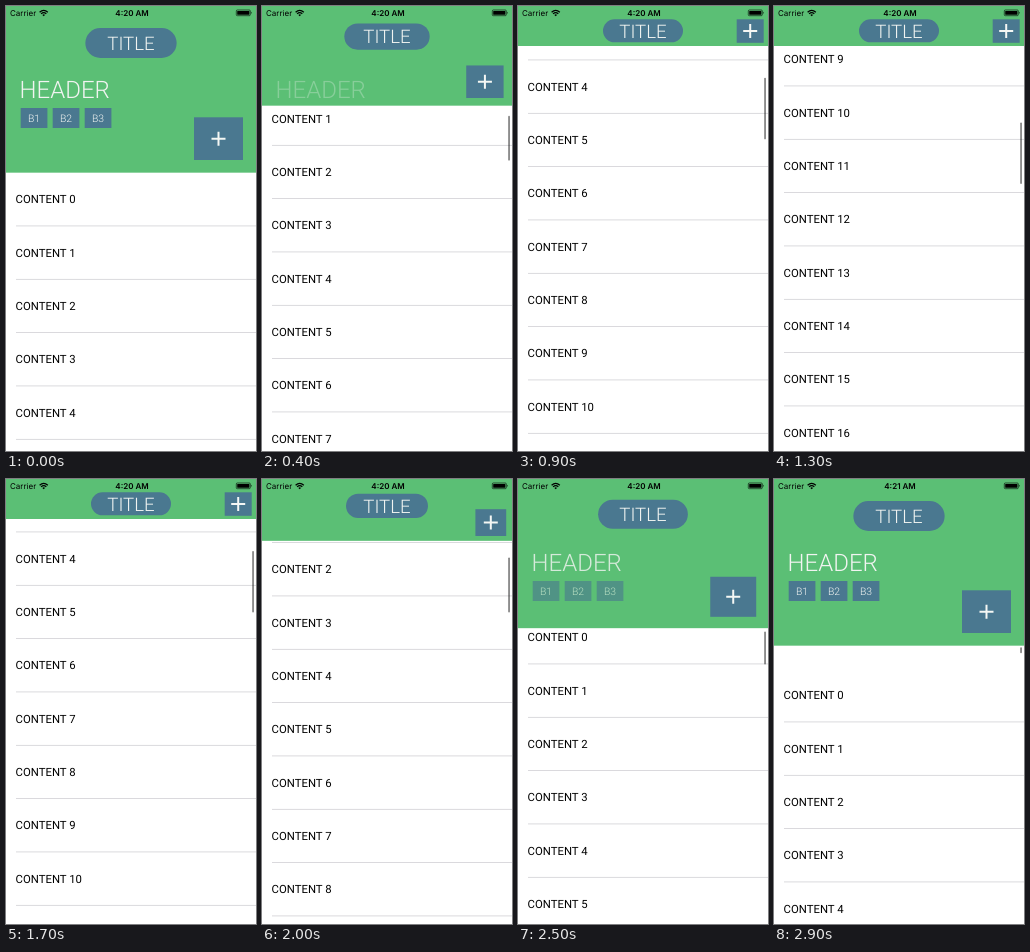
An HTML page that plays this animation: 250 by 445 pixels, repeating every 3000 ms.

```html
<!DOCTYPE html>
<html lang="en">
<head>
<meta charset="utf-8">
<title>Collapsing header</title>
<style>
  html, body { margin: 0; width: 100%; height: 100%; overflow: hidden; background: #fff; }
  svg { display: block; width: 100vw; height: 100vh; }
  text { font-family: Roboto, sans-serif; text-rendering: geometricPrecision; }
  .status text { font: 8px Inter, sans-serif; }
  .status .clock { font-weight: 600; }
  .light { fill: #f1f4f1; font-weight: 300; }
  .mid { text-anchor: middle; }
  .row { font-size: 11.33px; }
  .box { fill: #4a7890; }
</style>
</head>
<body>
<svg id="stage" viewBox="0 0 250 445">
  <rect width="250" height="445" fill="#fff"/>
  <g id="list"></g>
  <rect id="bar" x="246.2" width="1.7" rx=".85" fill="#000" fill-opacity=".5"/>
  <clipPath id="clip"><rect id="clipBox" width="250"/></clipPath>
  <rect id="header" width="250" fill="#5bbf75"/>
  <g clip-path="url(#clip)">
    <text id="heading" class="light" x="13.6" y="91.6" font-size="24">HEADER</text>
    <g id="tabs"></g>
  </g>
  <rect id="pill" class="box"/>
  <text id="title" class="light mid" x="125" font-size="18.67">TITLE</text>
  <rect id="add" class="box"/>
  <path id="plus" d="M-7 0H7M0 -7V7" stroke="#f4f7f4" stroke-width="2"/>
  <g class="status">
    <text x="4" y="9.8">Carrier</text>
    <g fill="none" stroke="#000" stroke-width="1.25">
      <path d="M33.6 6.3Q37.7 2.3 41.8 6.3M35.1 7.9Q37.7 5.4 40.3 7.9"/>
      <path d="M37.7 10.2L36.4 8.9Q37.7 7.8 39 8.9Z" fill="#000" stroke="none"/>
    </g>
    <text id="clock" class="clock mid" x="126" y="9.8"></text>
    <rect x="230.3" y="4" width="14" height="5.7" rx="1" fill="none" stroke="#000" stroke-width=".6"/>
    <rect x="231.2" y="4.9" width="12.2" height="3.9" rx=".4"/>
    <path d="M245.2 5.8Q246.5 6.8 245.2 7.9Z"/>
  </g>
</svg>
<script>
const $ = id => document.getElementById(id);
const LOOP = 3000, STEP = 100;
const STAGE = 445, TALL = 166.67, SHORT = 40;
const ROW = 160 / 3, ROWS = 50, SHOWN = 24;

// scroll offset: [ms, px]
const KEYS = [[0, 0], [400, 134], [900, 326], [1300, 620], [1700, 327], [2200, 142], [2500, 35], [2900, -23]];

function make(parent, tag, attrs, label = '') {
  const el = document.createElementNS('http://www.w3.org/2000/svg', tag);
  set(el, attrs);
  el.textContent = label;
  parent.append(el);
}

function set(el, attrs) {
  for (const k in attrs) el.setAttribute(k, attrs[k]);
}

for (let i = 0; i < SHOWN; i++) {
  const y = i * ROW;
  make($('list'), 'text', { class: 'row', x: 9.6, y: y + 30.7 }, 'CONTENT ' + i);
  make($('list'), 'rect', { x: 10, y: y + ROW - 0.4, width: 240, height: 0.67, fill: '#c8c7cc' });
}
for (let i = 0; i < 3; i++) {
  const x = 14.7 + i * 32;
  make($('tabs'), 'rect', { class: 'box', x, y: 102, width: 26.7, height: 20 });
  make($('tabs'), 'text', { class: 'light mid', x: x + 13.35, y: 115.7, 'font-size': 10.4 }, 'B' + (i + 1));
}

const rate = i => (KEYS[i + 1][1] - KEYS[i][1]) / (KEYS[i + 1][0] - KEYS[i][0]);

// slope that keeps the curve free of overshoot
function slope(i) {
  if (i === 0) return rate(0);
  if (i === KEYS.length - 1) return 0;
  const a = rate(i - 1), b = rate(i);
  return a * b <= 0 ? 0 : 2 * a * b / (a + b);
}

function scrollAt(t) {
  let i = 0;
  while (i < KEYS.length - 2 && t > KEYS[i + 1][0]) i++;
  const [t0, y0] = KEYS[i], [t1, y1] = KEYS[i + 1];
  const d = t1 - t0, u = (t - t0) / d, v = 1 - u;
  return v * v * (1 + 2 * u) * y0 + u * u * (3 - 2 * u) * y1
    + d * u * v * (v * slope(i) - u * slope(i + 1));
}

const clamp = (v, lo, hi) => Math.min(hi, Math.max(lo, v));

function draw(t) {
  const s = scrollAt(t);
  const h = clamp(TALL - s / 2, SHORT, TALL);
  const p = (TALL - h) / (TALL - SHORT);
  const mix = (a, b) => a + (b - a) * p;

  set($('list'), { transform: `translate(0 ${TALL - s})` });
  set($('header'), { height: h });
  set($('clipBox'), { height: h });
  set($('heading'), { opacity: clamp(1 - p * 1.33, 0, 1) });
  set($('tabs'), { opacity: clamp(1 - p * 2.8, 0, 1) });

  const pw = mix(91.3, 80), ph = mix(30, 23), py = mix(22, 13.3);
  set($('pill'), { x: 125 - pw / 2, y: py, width: pw, height: ph, rx: ph / 2 });
  set($('title'), { y: py + ph / 2 + 6.7 });

  const ax = mix(188, 218.7), ay = mix(111.3, 13.3), aw = mix(49, 27), ah = mix(42.7, 23.5);
  set($('add'), { x: ax, y: ay, width: aw, height: ah });
  set($('plus'), { transform: `translate(${ax + aw / 2} ${ay + ah / 2})` });

  // the scroll bar shrinks while the list is pulled past its top
  const view = STAGE - h, total = ROWS * ROW, past = s - (TALL - h);
  set($('bar'), {
    y: h + 1.5 + Math.max(0, past) * view / total,
    height: Math.max(4, view * view / total + Math.min(0, past)),
    opacity: t < STEP ? 0 : 1
  });
  $('clock').textContent = t < 2600 ? '4:20 AM' : '4:21 AM';
}

const start = performance.now();
function tick() {
  const t = (performance.now() - start) % LOOP;
  draw(Math.floor(t / STEP) * STEP);
  requestAnimationFrame(tick);
}
tick();
</script>
</body>
</html>
```
